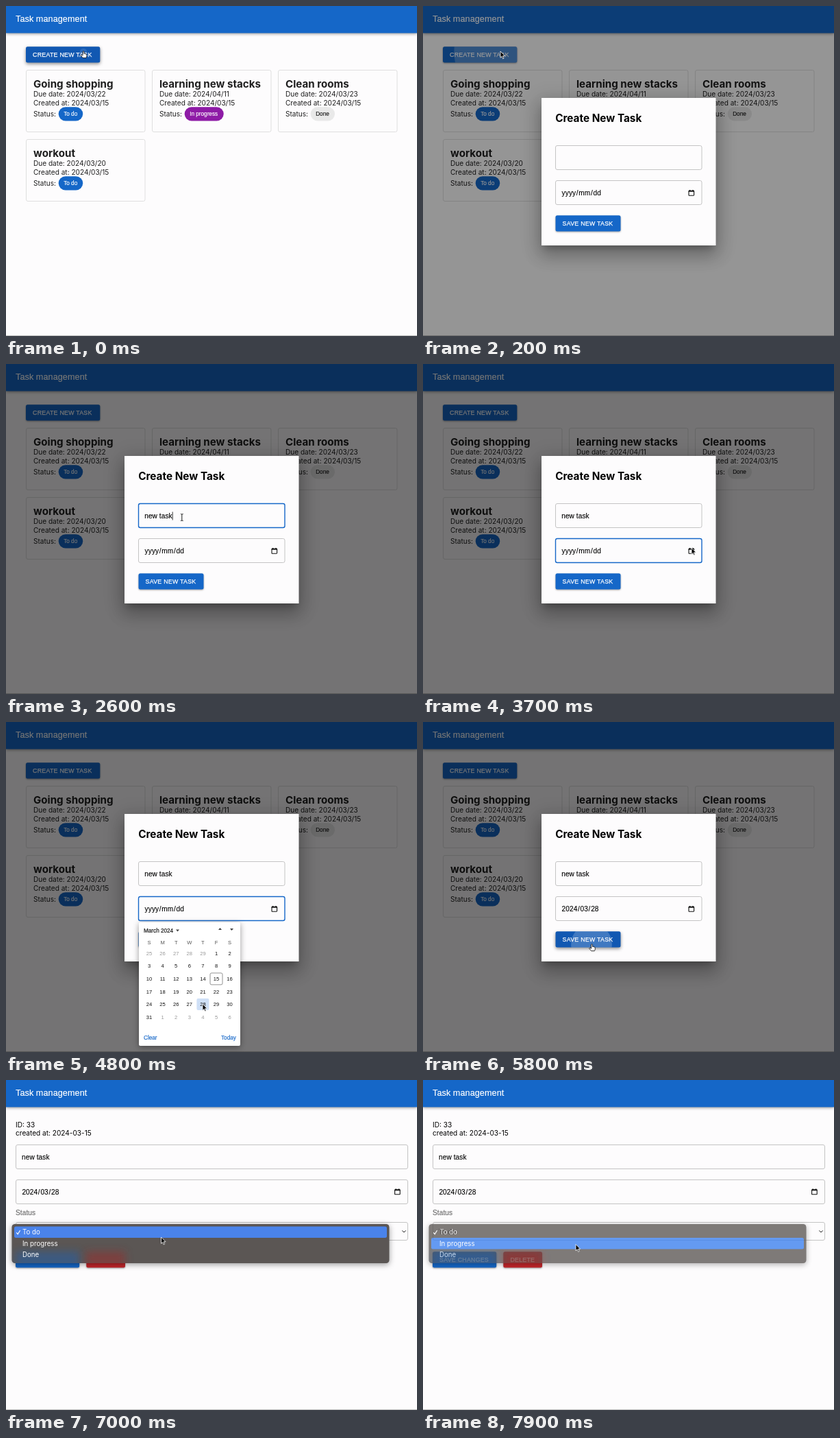
Animation of 600 by 481 pixels, one loop 8000 ms. Source, as an HTML page:

```html
<!DOCTYPE html>
<html lang="en">
<head>
<meta charset="utf-8">
<title>Task management</title>
<style>
  html, body { margin: 0; width: 100%; height: 100%; overflow: hidden; background: #fdfcfd; }
  svg { display: block; width: 600px; height: 481px; }
  text { white-space: pre; stroke-width: 0; }
  .body { font: 400 10.08px Inter, sans-serif; }
  .head { font: 700 15.12px Inter, sans-serif; }
  .title { font: 700 15.3px Inter, sans-serif; }
  .ui { font: 400 10.08px "Liberation Sans", Arial, sans-serif; letter-spacing: .00938em; stroke-width: .12px; }
  .bar { font: 400 12.6px "Liberation Sans", Arial, sans-serif; letter-spacing: .0075em; stroke-width: .2px; }
  .btn { font: 400 8.82px "Liberation Sans", Arial, sans-serif; letter-spacing: .02857em; stroke-width: .25px; }
  .chip { font: 400 8.19px "Liberation Sans", Arial, sans-serif; stroke-width: .15px; }
  .item { font: 400 9.7px Inter, sans-serif; }
  .day { font: 400 7.6px "Liberation Sans", Arial, sans-serif; text-anchor: middle; }
  .raised { filter: drop-shadow(0 1.2px 1.2px rgba(0,0,0,.36)); }
  .raised.hover { filter: drop-shadow(0 2px 2.4px rgba(0,0,0,.45)); }
  .appbar { filter: drop-shadow(0 1.6px 2.2px rgba(0,0,0,.42)); }
  .float { filter: drop-shadow(0 2px 4px rgba(0,0,0,.4)); }
</style>
</head>
<body>
<svg id="stage" viewBox="0 0 600 481" xmlns="http://www.w3.org/2000/svg"></svg>
<script>
const LOOP = 8000, STEP = 100;
const BLUE = '#1567c8', BLUE_HOVER = '#1158b2', PURPLE = '#8e1ba6', RED = '#c4262b';
const INK = '#1f1f1f', PAPER = '#fdfcfd', LINE = '#c4c4c4';

const rect = (x, y, w, h, fill, more = '') =>
  `<rect x="${x}" y="${y}" width="${w}" height="${h}" fill="${fill}" ${more}/>`;
const text = (x, y, cls, str, fill = '#000', more = '') =>
  `<text x="${x}" y="${y}" class="${cls}" fill="${fill}" stroke="${fill}" ${more}>${str}</text>`;
const field = (id, x, y, w, h = 35) =>
  rect(x, y, w, h, 'none', `id="${id}" rx="2.5" stroke="${LINE}"`);
const dateText = (id, x, y, str) =>
  text(x, y, 'ui', str, '#000', `id="${id}" dx=".6 0 0 0 .63 .63 0 .63 .63"`);

function button(id, x, y, w, label, fill = BLUE) {
  return `<clipPath id="${id}Clip">${rect(x, y, w, 23.2, '#000', 'rx="2.5"')}</clipPath>` +
    rect(x, y, w, 23.2, fill, `id="${id}" rx="2.5" class="raised"`) +
    text(x + 10.1, y + 14.9, 'btn', label, '#fff') +
    `<g clip-path="url(#${id}Clip)"><circle id="${id}Ripple" fill="#fff" r="0"/></g>`;
}

function card(x, y, title, due, status, width, fill, ink = '#fff') {
  return rect(x + .5, y + .5, 173.5, 90, 'none', 'rx="2.5" stroke="#dfdfdf"') +
    text(x + 11, y + 25.5, 'head', title, INK) +
    text(x + 11, y + 39.2, 'body', 'Due date: ' + due, INK) +
    text(x + 11, y + 51.7, 'body', 'Created at: 2024/03/15', INK) +
    text(x + 11, y + 67.6, 'body', 'Status:', INK) +
    rect(x + 47.7, y + 54.2, width, 20.2, fill, 'rx="10.1"') +
    text(x + 55.2, y + 67.2, 'chip', status, ink);
}

const calendarIcon = (x, y) =>
  `<g transform="translate(${x} ${y})"><rect x=".6" y="1.4" width="7.6" height="7" rx=".6" fill="none" stroke="#111" stroke-width="1.1"/>` +
  `<path d="M.5 2.2H8.3M2.2 .2V2M6.6 .2V2" stroke="#111" stroke-width="1.4"/></g>`;

function datePicker() {
  const x0 = 209, y0 = 340, dx = 19.6, dy = 18.6;
  let s = rect(194, 292, 148, 180, '#fff', 'rx="2" class="float"') +
    text(201, 307, 'chip', 'March 2024', '#111') +
    '<path d="M248 302.5h5l-2.5 3zM310 303h5l-2.5-3zM327 301h5l-2.5 3z" fill="#444"/>';
  [...'SMTWTFS'].forEach((d, i) => s += text(x0 + i * dx, 324, 'day', d, '#555'));
  s += rect(x0 + 4 * dx - 9, y0 + 4 * dy - 11.3, 18, 17, '#cfe0f7', 'id="dayHover" rx="2"');
  s += rect(x0 + 5 * dx - 9, y0 + 2 * dy - 11.3, 18, 17, 'none', 'rx="2" stroke="#767676" stroke-width=".8"');
  for (let i = 0; i < 42; i++) {
    const n = i - 4, inside = n > 0 && n < 32;
    const label = inside ? n : n < 1 ? n + 29 : n - 31;
    s += text(x0 + i % 7 * dx, y0 + Math.floor(i / 7) * dy - .2, 'day', label, inside ? '#111' : '#999');
  }
  return s + text(201, 463, 'chip', 'Clear', BLUE) + text(314, 463, 'chip', 'Today', BLUE);
}

// box shadow of the dialog: offset, spread, opacity, blur filter
const shadow = (dy, spread, alpha, blurId) =>
  rect(173 - spread, 134 + dy - spread, 254.5 + 2 * spread, 215 + 2 * spread, '#000',
    `opacity="${alpha}" filter="url(#${blurId})"`);

const listPage = `<g id="list">
  ${rect(0, 0, 600, 39.5, BLUE, 'class="appbar"')}${text(14, 23, 'bar', 'Task management', '#fff')}
  ${button('create', 29, 59.2, 108.3, 'CREATE NEW TASK')}
  ${card(29, 93, 'Going shopping', '2024/03/22', 'To do', 35.5, BLUE)}
  ${card(213, 93, 'learning new stacks', '2024/04/11', 'In progress', 57, PURPLE)}
  ${card(397, 93, 'Clean rooms', '2024/03/23', 'Done', 35.3, '#e9e9e9', INK)}
  ${card(29, 194, 'workout', '2024/03/20', 'To do', 35.5, BLUE)}
  ${rect(0, 480, 600, 1, '#bdbdbd')}
</g>`;

const dialog = `${rect(0, 0, 600, 481, '#000', 'id="backdrop"')}
<g id="dialog">
  ${shadow(5.7, 5, .15, 'wide')}${shadow(15, 2, .18, 'soft')}${shadow(7, -4.4, .24, 'near')}
  ${rect(173, 134, 254.5, 215, PAPER)}
  ${text(193.2, 169, 'title', 'Create New Task')}
  ${field('nameBox', 193.5, 203.5, 213.5)}${field('dateBox', 193.5, 254.5, 213.5)}
  ${text(202.2, 225, 'ui', '', '#000', 'id="name"')}
  ${rect(0, 215.5, .8, 12, '#000', 'id="caret"')}
  ${dateText('date', 202, 276, 'yyyy/mm/dd')}${calendarIcon(387.4, 267.8)}
  ${button('save', 193.5, 305.3, 95, 'SAVE NEW TASK')}
  <g id="picker">${datePicker()}</g>
</g>`;

const menu = `<g id="menu">
  <clipPath id="menuClip">${rect(8.5, 210, 551, 57, '#000', 'rx="4.5"')}</clipPath>
  ${rect(8.5, 210, 551, 57, '#5b5654', 'rx="4.5" class="float"')}
  <g clip-path="url(#menuClip)">
    ${rect(14, 250, 93, 24, '#1f5fae', 'opacity=".5" filter="url(#tint)"')}
    ${rect(117, 250, 57, 24, '#9c2a2c', 'opacity=".5" filter="url(#tint)"')}
  </g>
  ${rect(12, 213.5, 544, 16.5, '#4a83ea', 'id="active" rx="2.5"')}
  <path d="M15.3 222.3l1.9 2.4 3.4-5.4" fill="none" stroke="#fff" stroke-width="1.2"/>
  ${['To do', 'In progress', 'Done'].map((s, i) => text(24, 225.2 + i * 16.5, 'item', s, '#fff')).join('')}
</g>`;

const detailPage = `<g id="detail">
  ${rect(0, 0, 600, 481, PAPER)}
  ${rect(0, 0, 600, 39.5, BLUE, 'class="appbar"')}${text(14, 23, 'bar', 'Task management', '#fff')}
  ${text(14, 69, 'body', 'ID: 33')}${text(14, 81.4, 'body', 'created at: 2024-03-15')}
  ${field('d1', 14.5, 94.5, 572)}${field('d2', 14.5, 145.5, 572)}
  ${text(23, 116, 'ui', 'new task')}${dateText('d3', 22.8, 167, '2024/03/28')}${calendarIcon(567, 158.4)}
  ${text(14, 197, 'ui', 'Status', '#666')}
  ${field('d4', 14.5, 207.5, 572, 26)}${text(23, 224.5, 'ui', 'To do')}
  <path d="M578.4 219.4l2.6 2.6 2.6-2.6" fill="none" stroke="#222"/>
  ${button('change', 14, 250.3, 93.2, 'SAVE CHANGES')}${button('remove', 117.3, 250.3, 56.7, 'DELETE', RED)}
  ${rect(0, 480, 600, 1, '#bdbdbd')}
  ${menu}
</g>`;

const cursors = `<g id="cursor">
  <path id="arrow" d="M0 0V9.4L2.1 7.4 3.6 10.9 5.1 10.2 3.6 6.8H6.6Z" fill="#000" stroke="#fff" stroke-width=".8"/>
  <path id="hand" transform="scale(.88)" d="M-1.1 .9a1.1 1.1 0 0 1 2.2 0V4q1-.6 1.7.2 1-.4 1.4.5 1.2-.2 1.2 1V8q0 1.4-1 3H-.9L-4 7.4q-.6-1 .2-1.4T-1.1 7Z" fill="#fff" stroke="#000" stroke-width=".9"/>
  <path id="beam" d="M-1.8-5Q0-5 0-4Q0-5 1.8-5M0-4V4M-1.8 5Q0 5 0 4Q0 5 1.8 5" fill="none" stroke="#000" stroke-width=".9"/>
</g>`;

const blur = (id, d) =>
  `<filter id="${id}" x="-30%" y="-60%" width="160%" height="220%"><feGaussianBlur stdDeviation="${d}"/></filter>`;
const stage = document.getElementById('stage');
stage.innerHTML = blur('wide', 14.5) + blur('soft', 12) + blur('near', 4.7) + blur('tint', 6) +
  rect(0, 0, 600, 481, PAPER) + listPage + dialog + detailPage + cursors;

const $ = id => document.getElementById(id);
const show = (id, on) => $(id).setAttribute('display', on ? 'inline' : 'none');
const set = (id, attrs) => { for (const k in attrs) $(id).setAttribute(k, attrs[k]); };
const clamp = v => Math.max(0, Math.min(1, v));

// cubic-bezier(.4, 0, .2, 1)
function ease(p) {
  p = clamp(p);
  let lo = 0, hi = 1;
  for (let i = 0; i < 20; i++) {
    const u = (lo + hi) / 2, v = 1 - u;
    if (1.2 * v * v * u + .6 * v * u * u + u * u * u < p) lo = u; else hi = u;
  }
  return lo * lo * (3 - 2 * lo);
}

const path = [
  [0, 113, 66], [400, 113, 66], [900, 252, 222], [2500, 252, 222], [3400, 392, 268],
  [4000, 392, 268], [4600, 287, 411], [5000, 287, 411], [5500, 246.5, 324],
  [6400, 246.5, 324], [6800, 226, 224], [7000, 226.5, 229], [7200, 226.5, 229], [7600, 223, 239.5]
];
function pointer(t) {
  const i = path.findIndex(k => k[0] > t);
  if (i < 0) return path[path.length - 1].slice(1);
  const [t0, x0, y0] = path[i - 1], [t1, x1, y1] = path[i];
  const p = clamp((t - t0) / (t1 - t0)), e = p * p * (3 - 2 * p);
  return [x0 + (x1 - x0) * e, y0 + (y1 - y0) * e];
}

function ripple(id, x, y, radius, age) {
  const on = age >= 0 && age < 800;
  set(id + 'Ripple', {
    cx: x, cy: y, r: on ? radius * ease(age / 550) : 0,
    opacity: (.1 + .18 * ease(age / 550)) * (1 - clamp((age - 300) / 500))
  });
}

function hover(id, on) {
  set(id, { fill: on ? BLUE_HOVER : BLUE, class: on ? 'raised hover' : 'raised' });
}

function focus(id, on) {
  set(id, { stroke: on ? BLUE : LINE, 'stroke-width': on ? 1.4 : 1 });
}

function draw(t) {
  const open = t >= 100 && t < 6000, detail = t >= 6000;
  const [x, y] = pointer(t);

  show('list', !detail);
  show('detail', detail);
  show('dialog', open && t < 5900);
  show('backdrop', open);
  set('backdrop', { opacity: .54 * ease((t - 90) / 225) * (1 - ease((t - 5850) / 195)) });

  hover('create', t < 200);
  ripple('create', 113, 67, 86, t + 80);
  hover('save', t >= 5500);
  ripple('save', 246, 324, 56, t - 5600);

  const typed = 'new task'.slice(0, Math.max(0, Math.floor((t - 1300) / 130) + 1));
  const name = $('name');
  if (name.textContent !== typed) name.textContent = typed;
  const nameFocus = t >= 1000 && t < 3500;
  focus('nameBox', nameFocus);
  const idle = t > 2300 ? t - 2300 : t < 1300 ? t - 1000 : 0;
  show('caret', nameFocus && idle % 1000 < 500);
  set('caret', { x: 202.2 + (typed ? name.getComputedTextLength() : 0) });

  focus('dateBox', t >= 3500 && t < 5600);
  $('date').textContent = t < 4900 ? 'yyyy/mm/dd' : '2024/03/28';
  show('picker', t >= 3800 && t < 4900);
  show('dayHover', t >= 4500);

  // menu: second row turns active, blinks on click, then fades
  const second = t >= 7400;
  show('menu', t >= 6900);
  set('menu', { opacity: t >= 7900 ? .78 : 1 });
  show('active', t !== 7800);
  set('active', { y: second ? 230 : 213.5, fill: t >= 7900 ? '#3a7ff0' : '#4a83ea' });

  const overName = t > 300 && t < 3400 && x > 194 && x < 407 && y > 204 && y < 239;
  const overDate = t > 2500 && t < 3400 && x < 384 && y > 254 && y < 290;
  const hand = t < 100 || (t >= 5500 && t < 6000);
  const beam = overName || overDate;
  show('cursor', t < 1200 || t >= 2500);
  show('hand', hand);
  show('beam', beam && !hand);
  show('arrow', !hand && !beam);
  set('cursor', { transform: `translate(${x} ${y})` });
}

function tick(now) {
  draw(Math.floor(now % LOOP / STEP) * STEP);
  requestAnimationFrame(tick);
}
draw(0);
requestAnimationFrame(() => tick(performance.now()));
</script>
</body>
</html>
```
